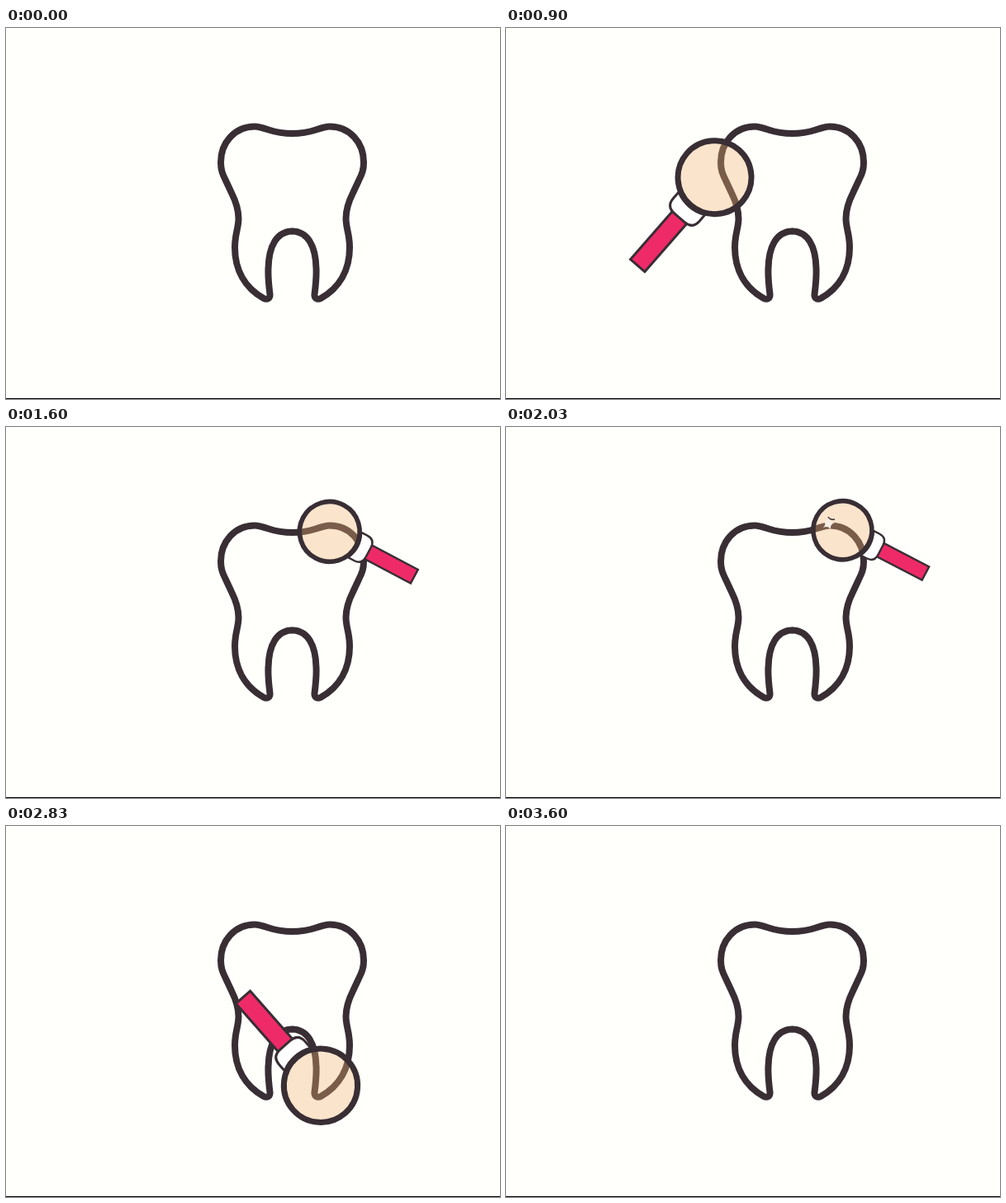
These frames come from a looping animation (598 px wide and 450 px high, 3.63 s). An HTML page:

```html
<!DOCTYPE html>
<html lang="en">
<head>
<meta charset="utf-8">
<title>Tooth check</title>
<style>
  html, body { margin: 0; height: 100%; overflow: hidden; background: #fffffc; }
  svg { display: block; width: 598px; height: 450px; }
</style>
</head>
<body>
<svg viewBox="0 0 598 450" fill="none" stroke="#382e34">
  <g stroke-width="8" stroke-linejoin="round">
    <path id="half" d="M347 128C335 128 327 126.500 318 123.500C309 120.500 306 119.500 301 119.500C277 119.500 260 139 260 163C260 172 262 177 266 185L273 200C279 212 281.500 220 281.500 231C281.500 243 277 250 277 266C277 293 289 315 312 328C316 330 320 328 319.500 323C318 311 317 303 317.500 292C318 264 328 246.500 347 246.500"/>
    <use href="#half" transform="matrix(-1 0 0 1 693 0)"/>
  </g>
  <g id="glass">
    <rect x="64" y="-11.500" width="78" height="23" fill="#ef2a69" stroke-width="3"/>
    <path d="M42 -21H52Q65 -21 65 -8V8Q65 21 52 21H42A47 47 0 0 0 42 -21" fill="#fff" stroke-width="3"/>
    <circle r="44.500" fill="#f1b270" fill-opacity=".35" stroke-width="7"/>
  </g>
  <g id="spark">
    <path d="M0 -8Q1 -2 8 -1Q2 1 3 7Q0 2 -6 5Q-2 1 -5 -3Q-1 -2 0 -8" fill="#f8eee4" stroke="none"/>
    <path d="M0 -8Q2 -4 8 -5" stroke-width="1.500"/>
  </g>
  <path d="M0 449.500H598" stroke="#000"/>
</svg>
<script>
const LOOP = 3630;

// Poses are [x, y, handle angle, scale]
const entry = [60, 520, 137.7, 1];
const left = [244, 180, 137.7, 1];
const top_ = [403, 117, 20, .79];
const root = [381, 315, 222, 1];
const gone = [380, 303, 365, 0];

// Each leg bends towards a middle pose; between legs the glass rests
const legs = [
  { start: 0, end: 720, path: [entry, [143, 195, 137.7, 1], left] },
  { start: 720, end: 1800, path: [left, [320, 193, 78.8, 1], top_] },
  { start: 1930, end: 2670, path: [top_, [465, 228, 121, .895], root] },
  { start: 2750, end: 3580, path: [root, [380, 309, 400, 1.1], gone] },
];

const glass = document.getElementById('glass');
const spark = document.getElementById('spark');
const clamp = v => Math.max(0, Math.min(1, v));
const ease = u => u < .5 ? 2 * u * u : 1 - 2 * (1 - u) ** 2;
const bend = (a, b, c, e) => (1 - e) ** 2 * a + 2 * e * (1 - e) * b + e * e * c;

function pose(t) {
  const { start, end, path: [from, via, to] } = legs.findLast(leg => t >= leg.start);
  const e = ease(clamp((t - start) / (end - start)));
  return from.map((v, i) => bend(v, via[i], to[i], e));
}

function place(node, x, y, angle, scale) {
  node.setAttribute('transform', `translate(${x} ${y}) rotate(${angle}) scale(${scale})`);
  node.style.display = scale > .01 ? '' : 'none';
}

function draw() {
  const t = performance.now() % LOOP;
  place(glass, ...pose(t));
  place(spark, 390, 117, 0, clamp(Math.min((t - 1850) / 120, (2150 - t) / 100)));
  requestAnimationFrame(draw);
}
draw();
</script>
</body>
</html>
```
